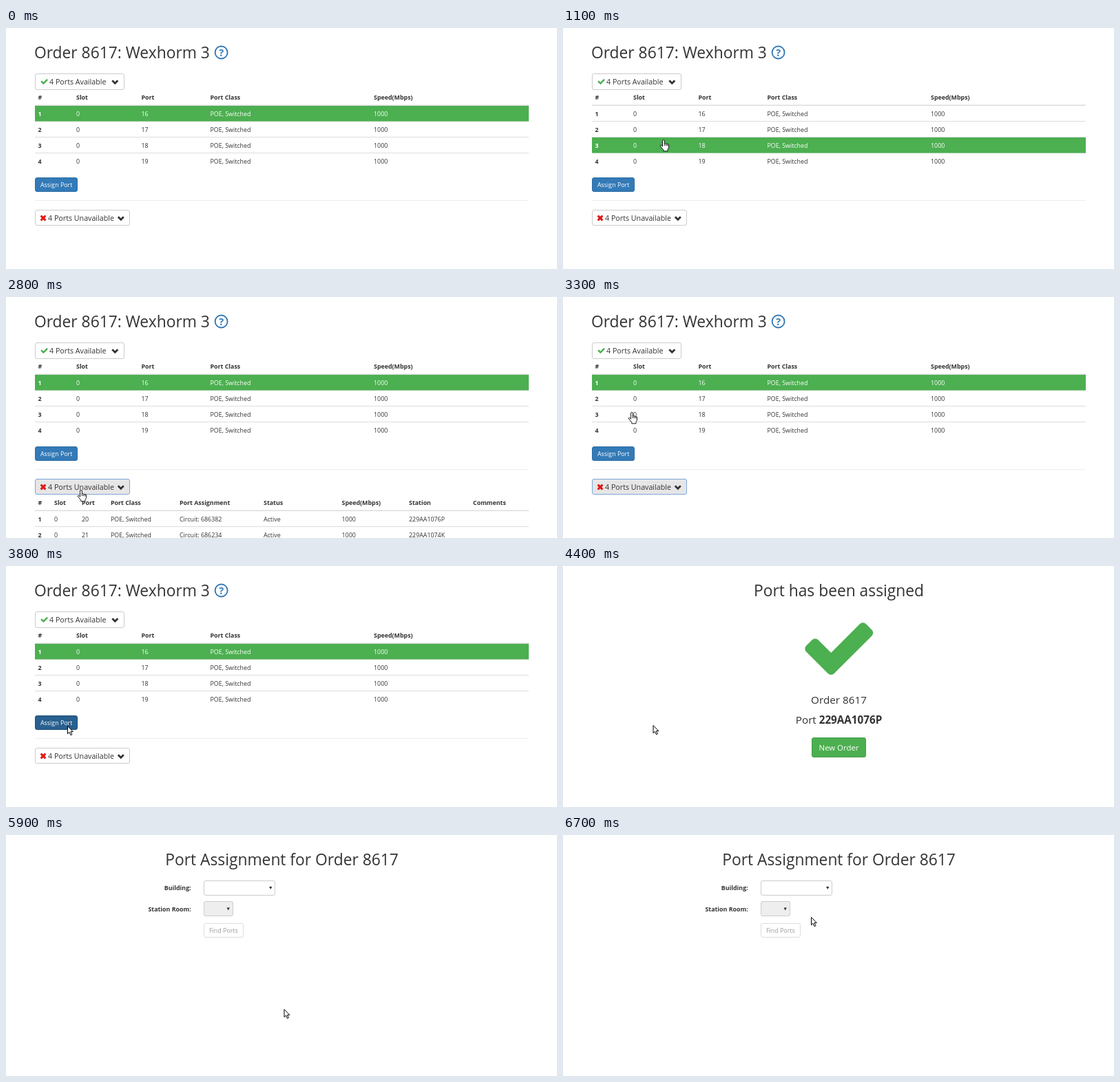
Recreate the animation shown at these times as an HTML page. Size 800 px wide and 350 px high, loop 6.9 s.

```html
<!DOCTYPE html>
<html lang="en">
<head>
<meta charset="utf-8">
<title>Port assignment</title>
<style>
  html, body { margin: 0; width: 100%; height: 100%; overflow: hidden; background: #fff; }
  svg { display: block; }
  text { font: 8.87px "Open Sans", sans-serif; white-space: pre; }
  .b { font-weight: 700; }
  .h1 { font-size: 22.8px; }
  .btn { font-size: 10.7px; }
  .selected rect { fill: #4caf50; }
  .selected text { fill: #fff; }
</style>
</head>
<body>
<svg id="stage" width="800" height="350" viewBox="0 0 800 350" fill="#333"></svg>
<script>
const stage = document.getElementById('stage');

const text = (x, y, s, cls = '', attrs = '') => `<text x="${x}" y="${y}" class="${cls}" ${attrs}>${s}</text>`;
const mid = (y, s, size, attrs = '') => text(400.5, y, s, '', `text-anchor="middle" style="font-size:${size}px" ${attrs}`);
const box = (x, y, w, h, fill, stroke, attrs = '') =>
  `<rect x="${x + .5}" y="${y + .5}" width="${w - 1}" height="${h - 1}" rx="2.5" fill="${fill}" stroke="${stroke}" ${attrs}/>`;
const rule = (y, color = '#ddd', w = 1) => `<path d="M42 ${y}H759" stroke="${color}" stroke-width="${w}"/>`;
const cells = (xs, y, values, bold) =>
  values.map((v, i) => text(xs[i], y, v, bold || i === 0 ? 'b' : '')).join('');
const check = (x, y, scale) => `<path fill="#4caf50" transform="translate(${x} ${y}) scale(${scale})"
  d="M1671 566q0 40-28 68l-860 860q-28 28-68 28t-68-28l-498-498q-28-28-28-68t28-68l136-136q28-28 68-28t68 28l294 295 656-657q28-28 68-28t68 28l136 136q28 28 28 68z"/>`;
const chevron = (x, y) => `<path d="M${x - 4} ${y - 2}l4 4 4-4" fill="none" stroke="#333" stroke-width="2.7"/>`;
const bar = angle => `<rect x="-4.8" y="-1.5" width="9.6" height="3" rx=".8" transform="rotate(${angle})"/>`;

const freeCols = [46.5, 102, 196.5, 296.5, 534];
const usedCols = [46.5, 70, 110, 152, 252, 374, 487.5, 585, 678];

const freeRow = i => `<g class="row"><rect x="42" y="${113 + 23 * i}" width="717" height="22.5" fill="none"/>
  ${cells(freeCols, 127.5 + 23 * i, [i + 1, 0, 16 + i, 'POE, Switched', 1000])}</g>`;
const usedRow = (i, circuit, station) => cells(usedCols, 325.5 + 23 * i,
  [i + 1, 0, 20 + i, 'POE, Switched', 'Circuit: ' + circuit, 'Active', 1000, station]);

const portsPage = `
  ${text(41, 43.5, 'Order 8617: Wexhorm 3', 'h1')}
  <circle cx="312.6" cy="35.5" r="9" fill="none" stroke="#337ab7" stroke-width="1.9"/>
  ${text(312.6, 40.8, '?', 'b', 'text-anchor="middle" fill="#337ab7" style="font-size:14.5px"')}
  ${box(42, 66, 130, 24, '#fff', '#ccc')}${check(49.6, 71.8, .0067)}
  ${text(63, 82, '4 Ports Available', 'btn')}${chevron(158.3, 78.3)}
  ${cells(freeCols, 104, ['#', 'Slot', 'Port', 'Port Class', 'Speed(Mbps)'], true)}
  ${rule(112.3, '#ddd', 1.4)}${[135.5, 158.5, 181.5].map(y => rule(y)).join('')}
  ${[0, 1, 2, 3].map(freeRow).join('')}
  ${box(42, 217, 62, 21, '#337ab7', '#2e6da4', 'id="assign"')}
  ${text(50, 230.7, 'Assign Port', '', 'fill="#fff"')}
  ${rule(250.5, '#eee')}
  ${box(42, 264, 138, 23, '#fff', '#ccc', 'id="toggle"')}
  <g transform="translate(54 276)" fill="#e01818">${bar(45)}${bar(-45)}</g>
  ${text(61, 279.6, '4 Ports Unavailable', 'btn')}${chevron(166.8, 276.3)}
  <clipPath id="fold"><rect id="foldRect" y="288" width="800" height="0"/></clipPath>
  <g clip-path="url(#fold)">
    ${cells(usedCols, 302.2, ['#', 'Slot', 'Port', 'Port Class', 'Port Assignment', 'Status', 'Speed(Mbps)', 'Station', 'Comments'], true)}
    ${rule(310.3, '#ddd', 1.4)}${rule(333.5)}
    ${usedRow(0, 686382, '229AA1076P')}${usedRow(1, 686234, '229AA1074K')}
  </g>`;

const donePage = `
  ${mid(43.5, 'Port has been assigned', 22.8)}
  ${check(343.6, 61, .0638)}
  ${mid(200, 'Order 8617', 15.25)}
  ${mid(229, 'Port <tspan class="b">229AA1076P</tspan>', 15.25)}
  ${box(361, 249, 79, 29, '#4caf50', '#43a047', 'id="again"')}
  ${mid(268, 'New Order', 11.4, 'fill="#fff"')}`;

const formPage = `
  ${mid(43.5, 'Port Assignment for Order 8617', 22.8)}
  ${text(268.7, 80, 'Building:', 'b', 'text-anchor="end"')}
  ${text(268.7, 110.7, 'Station Room:', 'b', 'text-anchor="end"')}
  ${box(287, 66, 104, 22, '#fff', '#ccc')}<path d="M382 75h4.4l-2.2 4z"/>
  ${box(287, 96, 43, 22, '#eee', '#ccc')}<path d="M320.5 105.5h4.4l-2.2 4z"/>
  ${box(287, 128, 58, 21, '#fff', '#ddd')}
  ${text(295, 141.7, 'Find Ports', '', 'fill="#999"')}`;

stage.innerHTML = [portsPage, donePage, formPage].map(p => `<g class="page">${p}</g>`).join('') + `
  <g id="cursor" fill="#fff" stroke="#000" stroke-linejoin="round">
    <path id="arrow" d="M.5.5v11.2l2.5-2.4 2 4.4 1.9-.9-2-4.2h3.4z"/>
    <path id="hand" d="M-1.4 1.2q1.4-1.7 2.8 0V6q1.2-.9 2.3.3 1.2-.8 2.1.4 1.5-.5 1.7 1v4.1L6 14.6v2.2h-6.2v-1.7L-4.6 9.8q-.5-1.9 1.2-1.6l2 1.9zM1.4 6v3M3.7 6.5v2.7M5.8 7v2.4" stroke-width=".9"/>
  </g>`;

const $ = id => document.getElementById(id);
const pages = stage.querySelectorAll('.page');
const rows = stage.querySelectorAll('.row');

// Cursor path: time, x, y
const path = [
  [100, 762, 335], [400, 420, 215], [700, 150, 117], [900, 148, 140], [1100, 146, 162],
  [1400, 142, 192], [1600, 140, 118], [1700, 138, 120], [2000, 108, 271], [2100, 109, 280],
  [3000, 109, 280], [3300, 100, 167], [3500, 89, 222], [3800, 89, 232], [4300, 89, 232],
  [4700, 255, 228], [5000, 398, 254], [5200, 406, 254], [6300, 402, 252], [6700, 360, 119]
];
const clicks = [[0, 0], [900, 1], [1100, 2], [1300, 3], [1600, 0]];

const clamp = v => Math.min(1, Math.max(0, v));
const show = (el, on) => { el.style.display = on ? '' : 'none'; };
const paint = (id, fill, stroke) => { $(id).setAttribute('fill', fill); $(id).setAttribute('stroke', stroke); };

function cursorAt(t) {
  const i = path.findIndex(k => k[0] >= t);
  if (i < 1) return path[i < 0 ? path.length - 1 : 0].slice(1);
  const [t0, x0, y0] = path[i - 1], [t1, x1, y1] = path[i];
  const k = (t - t0) / (t1 - t0);
  return [x0 + (x1 - x0) * k, y0 + (y1 - y0) * k];
}

function draw(now) {
  const t = Math.floor(now % 6900 / 100) * 100;
  const page = t < 4100 ? 0 : t < 5700 ? 1 : 2;
  const [x, y] = cursorAt(t);
  const over = (l, top, r, b) => x >= l && x <= r && y >= top && y <= b;
  const onAssign = over(42, 217, 104, 238);
  const onAgain = over(361, 249, 440, 278);
  const hand = [
    over(42, 113, 759, 204) || over(42, 264, 180, 287) || onAssign && t < 3600,
    onAgain,
    false
  ][page];

  pages.forEach((p, i) => show(p, i === page));
  const selected = clicks.filter(c => c[0] <= t).pop()[1];
  rows.forEach((r, i) => r.classList.toggle('selected', i === selected));

  paint('assign', ...(onAssign ? ['#286090', '#204d74'] : ['#337ab7', '#2e6da4']));
  paint('again', ...(onAgain ? ['#449d44', '#398439'] : ['#4caf50', '#43a047']));
  const active = t >= 2000 && t < 3600;
  paint('toggle', active ? '#e6e6e6' : '#fff', !active ? '#ccc' : t < 2300 ? '#adadad' : '#7da7d9');
  $('foldRect').setAttribute('height', 115 * (clamp((t - 2200) / 400) - clamp((t - 2900) / 400)));

  show($('cursor'), t >= 100);
  show($('hand'), hand);
  show($('arrow'), !hand);
  $('cursor').setAttribute('transform', `translate(${x} ${y})`);
}

const start = performance.now();
(function loop() {
  draw(performance.now() - start);
  requestAnimationFrame(loop);
})();
</script>
</body>
</html>
```
